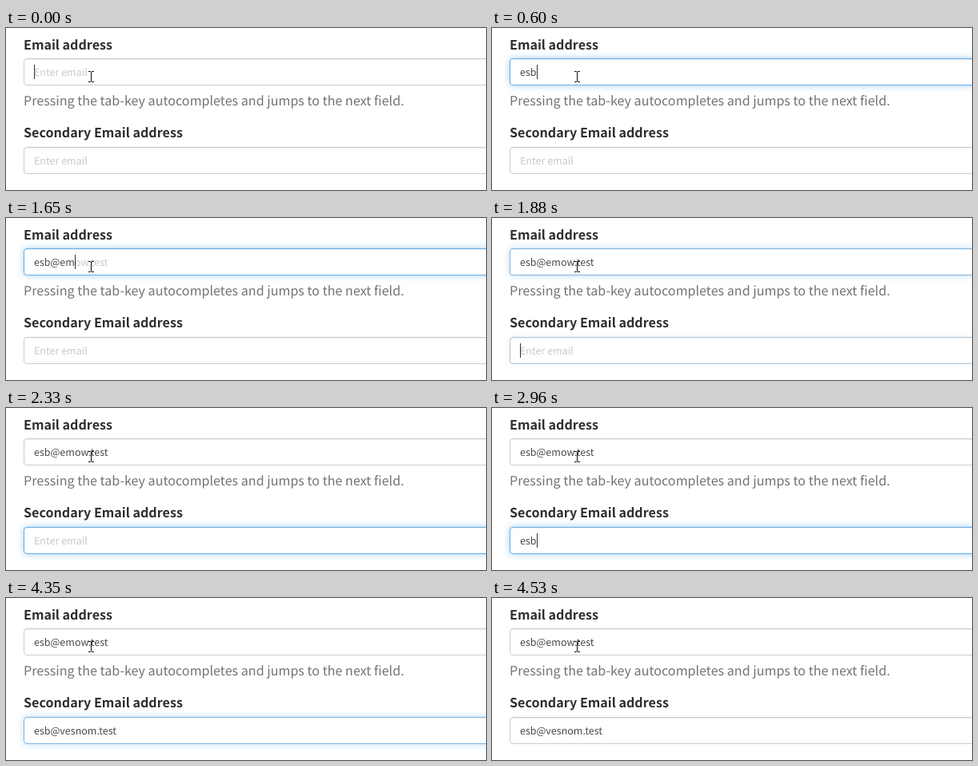
An HTML page that plays this animation: 600 by 203 pixels, repeating every 4660 ms.

```html
<!DOCTYPE html>
<html lang="en">
<head>
<meta charset="utf-8">
<title>Email autocomplete</title>
<style>
  html, body { margin: 0; width: 100%; height: 100%; overflow: hidden; background: #fff; }
  .stage { position: relative; width: 600px; height: 203px; overflow: hidden; }
  .box {
    position: absolute; left: 22px; width: 640px; height: 34px;
    box-sizing: border-box; border: 1px solid #ccc; border-radius: 4px; background: #fff;
  }
  svg { position: absolute; left: 0; top: 0; }
  text {
    font-family: "Noto Sans CJK JP", "Noto Sans CJK SC", "Noto Sans CJK", "Open Sans", sans-serif;
    font-size: 12.53px; white-space: pre; text-rendering: geometricPrecision;
  }
  .label { font-size: 16.11px; font-weight: 700; fill: #2e2e2e; }
  .help { font-size: 16.11px; fill: #737373; }
  .typed { fill: #484848; }
  .hint { fill: #c8c8cc; }
  .caret { fill: #333; }
</style>
</head>
<body>
<div class="stage">
  <div class="box" style="top:38px"></div>
  <div class="box" style="top:149px"></div>
  <svg width="600" height="203">
    <text class="label" x="22" y="27">Email address</text>
    <text class="help" x="22" y="97">Pressing the tab-key autocompletes and jumps to the next field.</text>
    <text class="label" x="22" y="137">Secondary Email address</text>
    <g class="field">
      <text x="35" y="60"><tspan class="typed"></tspan><tspan class="hint"></tspan></text>
      <rect class="caret" y="46" width="1" height="18"/>
    </g>
    <g class="field">
      <text x="35" y="171"><tspan class="typed"></tspan><tspan class="hint"></tspan></text>
      <rect class="caret" y="157" width="1" height="18"/>
    </g>
    <path d="M103 54.5h3m1 0h3M106.5 55v12M103 67.5h3m1 0h3" stroke="#111" fill="none" shape-rendering="crispEdges"/>
  </svg>
</div>
<script>
const LOOP = 4660;
const TEXT_X = 35;
const PLACEHOLDER = 'Enter email';
const FIRST = 'esb@emow.test';
const FIRST_GUESS = 'esb@enwam.test';
const SECOND = 'esb@vesnom.test';

// State of a field: typed characters, suggested address, focus strength, caret.
const field = (count, address, focus, caret) => ({ count, address, focus, caret });
const typing = (count, address = '') => field(count, address, 1, true);
const empty = (focus, caret) => field(0, '', focus, caret);
const filled = (address, focus = 0) => field(address.length, address, focus, false);

// Each row: start time, field index, new state.
const steps = [
  [0, 0, empty(0, true)],
  [0, 1, empty(0, false)],
  [80, 0, empty(0.5, true)],
  [160, 0, empty(1, true)],
  [290, 0, typing(1)],
  [440, 0, typing(2)],
  [600, 0, typing(3)],
  [1150, 0, typing(4)],
  [1320, 0, typing(5)],
  [1400, 0, typing(5, FIRST_GUESS)],
  [1570, 0, typing(6)],
  [1650, 0, typing(6, FIRST)],
  [1880, 0, filled(FIRST, 0.75)],
  [1880, 1, empty(0.25, true)],
  [1960, 0, filled(FIRST, 0.2)],
  [1960, 1, empty(0.8, true)],
  [2030, 0, filled(FIRST)],
  [2030, 1, empty(1, true)],
  [2330, 1, empty(1, false)],
  [2560, 1, typing(1)],
  [2790, 1, typing(2)],
  [2960, 1, typing(3)],
  [3420, 1, typing(4)],
  [3740, 1, typing(5)],
  [3820, 1, typing(5, SECOND)],
  [3970, 1, typing(6, SECOND)],
  [4120, 1, typing(7, SECOND)],
  [4350, 1, filled(SECOND, 0.75)],
  [4430, 1, filled(SECOND, 0.2)],
  [4530, 1, filled(SECOND)]
];

const boxes = document.querySelectorAll('.box');
const groups = document.querySelectorAll('.field');
const shown = [];

const mix = (from, to, k) => from + (to - from) * k;

function draw(index, state) {
  if (shown[index] === state) return;
  shown[index] = state;

  const { count, address, focus, caret } = state;
  const full = address || (index ? SECOND : FIRST);
  const typed = groups[index].querySelector('.typed');
  const bar = groups[index].querySelector('.caret');
  typed.textContent = full.slice(0, count);
  groups[index].querySelector('.hint').textContent = count ? address.slice(count) : PLACEHOLDER;

  const width = count ? typed.getComputedTextLength() : 0;
  bar.setAttribute('x', Math.round(TEXT_X + width));
  bar.setAttribute('visibility', caret ? 'visible' : 'hidden');

  const rgb = [102, 175, 233].map(c => Math.round(mix(204, c, focus)));
  boxes[index].style.borderColor = `rgb(${rgb})`;
  boxes[index].style.boxShadow =
    `inset 0 1px 1px rgba(0,0,0,.075), 0 0 8px rgba(102,175,233,${0.6 * focus})`;
}

function frame() {
  const time = performance.now() % LOOP;
  const states = [];
  for (const [start, index, state] of steps) {
    if (start <= time) states[index] = state;
  }
  states.forEach((state, index) => draw(index, state));
  requestAnimationFrame(frame);
}
frame();
</script>
</body>
</html>
```
